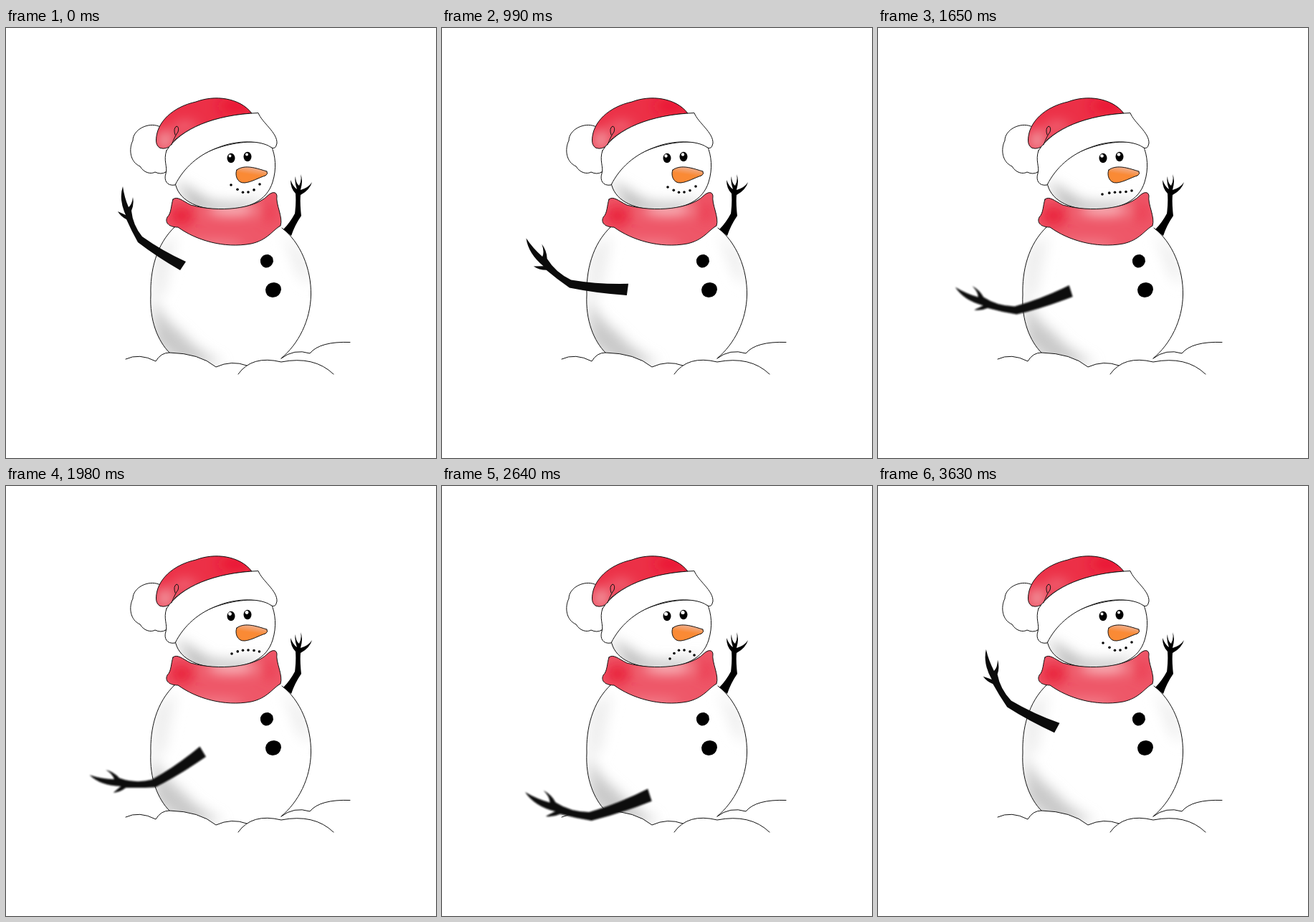
An HTML page that plays this animation: 600 by 600 pixels, repeating every 3960 ms.

```html
<!DOCTYPE html>
<html lang="en">
<head>
<meta charset="utf-8">
<title>Snowman</title>
<style>
  html, body { margin: 0; width: 100%; height: 100%; overflow: hidden; background: #fff; }
  svg { display: block; width: 100vw; height: 100vh; }
  .line { fill: none; stroke: #111; stroke-width: 1; stroke-linecap: round; stroke-linejoin: round; }
  .white { fill: #fff; }
</style>
</head>
<body>
<svg viewBox="0 0 600 600">
  <defs>
    <path id="bodyShape" d="M236,277 C209,302 201,340 202,372 C200,408 212,437 228,453 Q270,454 293,473 Q315,463 336,471 Q355,460 384,461 C408,441 425,408 425.500,372 C426,336 411,299 385,279 Z"/>
    <path id="headShape" d="M236,216 C240,239 264,253 301,253.500 C339,253 364,241 372,215 C378,196 376,178 370,164 C345,150 255,165 236,216 Z"/>
    <path id="hatShape" d="M209.500,156 C210,131 233,110 265,103 C291,93 326,97 343,119 C303,122 262,133 236,156 Q232,162 231,163 Q224,170 215,167.500 Q209,164 209.500,156 Z"/>
    <path id="scarfShape" d="M233,239 C239,234 246,241 258,247 C298,258 346,252 364,235 C371,228 377,228 378,234 C376,246 387,264 383,276 C372,282 365,296 342,301 C304,308 265,296 240,278 C228,278 221,272 225,264 C231,258 230,248 233,239 Z"/>
    <path id="noseShape" d="M322,198 C334,189 353,197 364,200 Q366,204 362,206 C352,209 343,215 333,216 C322,217 319,204 322,198 Z"/>
    <clipPath id="bodyClip"><use href="#bodyShape"/></clipPath>
    <clipPath id="headClip"><use href="#headShape"/></clipPath>
    <clipPath id="hatClip"><use href="#hatShape"/></clipPath>
    <clipPath id="scarfClip"><use href="#scarfShape"/></clipPath>
    <linearGradient id="orange" x1=".4" y1="1" x2=".7" y2="0">
      <stop offset=".5" stop-color="#fa8a35"/><stop offset="1" stop-color="#eeb6a0"/>
    </linearGradient>
    <filter id="soft" x="-60%" y="-60%" width="220%" height="220%"><feGaussianBlur stdDeviation="9"/></filter>
    <filter id="armBlur" x="-10%" y="-10%" width="120%" height="120%"><feGaussianBlur id="armBlurSize" stdDeviation="0"/></filter>
  </defs>

  <rect width="600" height="600" fill="#fff"/>

  <use href="#bodyShape" class="white"/>
  <g clip-path="url(#bodyClip)" filter="none">
    <g filter="url(#soft)">
      <path d="M203,370 Q216,405 245,425 Q265,450 303,468 L245,470 L208,440 Z" fill="#c9c9c9"/>
      <path d="M206,310 L238,288 L222,370 L202,380 Z" fill="#eee"/>
      <path d="M385,284 L414,315 L426,360 L408,345 Z" fill="#ececec"/>
    </g>
  </g>
  <path class="line" d="M236,277 C209,302 201,340 202,372 C200,408 212,437 228,453 M384,461 C408,441 425,408 425.500,372 C426,336 411,299 385,279"/>
  <path class="line" d="M167,462 Q186,453 209,465 Q216,453 228,453 Q270,454 293,473 Q315,463 336,471 M324,483 Q343,456 384,466 Q430,457 457,483 M384,461 Q402,447 424,454 Q438,437 480,438.500"/>

  <use href="#headShape" class="white"/>
  <g clip-path="url(#headClip)">
    <path filter="url(#soft)" d="M236,212 Q262,226 282,240 Q320,250 365,236 L330,258 L260,256 Z" fill="#bdbdbd"/>
  </g>
  <use href="#headShape" class="line"/>

  <use href="#scarfShape" fill="#ee5768"/>
  <g clip-path="url(#scarfClip)"><g filter="url(#soft)">
    <ellipse cx="245" cy="262" rx="17" ry="14" fill="#e9203a"/>
    <ellipse cx="315" cy="253" rx="34" ry="7" fill="#fbd5d6"/>
    <ellipse cx="368" cy="257" rx="10" ry="16" fill="#ec4055"/>
    <ellipse cx="290" cy="304" rx="42" ry="5" fill="#f49aa2"/>
  </g></g>
  <use href="#scarfShape" class="line"/>

  <path class="line white" d="M213,137 C198,131 177,142 177,157 C171,169 173,187 187,193 C193,203 203,204 208,201 Q216,205 223,201 L240,160 Z"/>
  <use href="#hatShape" fill="#ec3047"/>
  <g clip-path="url(#hatClip)"><g filter="url(#soft)">
    <ellipse cx="222" cy="157" rx="13" ry="15" fill="#f29aa2"/>
    <ellipse cx="320" cy="109" rx="24" ry="10" fill="#ea1433"/>
    <ellipse cx="250" cy="138" rx="17" ry="7" fill="#f17582"/>
  </g></g>
  <use href="#hatShape" class="line"/>
  <path class="line white" d="M224,171 C244,140 291,121 352,118.500 C357,132 379,146 378,161 Q376,171 369,166 C356,157 324,156 298,166 C269,176 248,195 236,219 C224,221 220,212 223,203 C226,194 219,185 224,171 Z"/>
  <path class="line" d="M231,163 Q236,150 240,145 Q242,138 238,137 Q233,140 236,149"/>

  <g>
    <ellipse cx="314" cy="181.500" rx="5.500" ry="6.700"/>
    <ellipse cx="337" cy="179.500" rx="5.500" ry="6.700"/>
    <circle class="glint white" cx="312.500" cy="178.500"/>
    <circle class="glint white" cx="336" cy="176.500"/>
  </g>
  <use href="#noseShape" fill="url(#orange)"/>
  <use href="#noseShape" class="line"/>
  <g id="mouth"></g>

  <path d="M355,323 Q358,315 366,316 Q373,318 373,326 Q370,335 362,334.500 Q354,332 355,323 Z"/>
  <path d="M362,365 Q364,355 374,355 Q384,356 384,365 Q382,376 372,376 Q362,375 362,365 Z"/>

  <path d="M387,281 Q396,272 403,259 Q405,245 404,231 Q397,224 397,212 Q401,222 406,225 Q402,214 404,207 Q404,216 409,220 Q413,213 411,204 Q415,212 411,226 Q422,223 427,215 Q424,226 411,233 Q410,245 412,262 Q403,275 398,290 Z"/>
  <g filter="url(#armBlur)">
    <path id="arm" fill="#0b0b0b" d="M251,326 L243,338 Q210,319 184,299 Q175,283 168,267 Q160,263 156,256 Q163,259 167,261 Q162,250 161,240 Q160,230 163,221 Q165,236 171,250 Q176,246 177,236 Q179,246 175,255 Q177,275 190,291 Q218,311 251,326 Z"/>
  </g>
</svg>
<script>
  const STEP = 330;
  // Each pose: elbow x, elbow y, arm turn, arm scale, left mouth corner x, y, right corner y, arm blur
  const poses = [
    [187, 295, 0, 1, 314, 219, 218, 0],
    [183, 304, -5, 1.06, 314, 219, 218, .5],
    [180, 331, -15.5, 1.1, 314, 220, 219, .6],
    [179, 357, -26, 1.14, 315, 222, 221, .7],
    [184, 376, -38.5, 1.16, 314, 227, 224, .8],
    [192, 394, -51, 1.16, 313, 232, 227, .8],
    [206, 415, -64.5, 1.16, 315, 234, 231, .8],
    [207, 438, -58, 1.2, 317, 238, 234, .9],
    [207, 461, -51.5, 1.25, 318, 241, 236, .9],
    [216, 476, -61.5, 1.23, 321, 241, 236, 1.1]
  ];
  const order = [0, 1, 2, 3, 4, 5, 6, 7, 8, 9, 0, 1];
  const byId = id => document.getElementById(id);
  const arm = byId('arm');
  const blur = byId('armBlurSize');
  const glints = document.querySelectorAll('.glint');
  const dots = Array.from({ length: 6 }, () => {
    const dot = document.createElementNS('http://www.w3.org/2000/svg', 'circle');
    dot.setAttribute('r', 1.8);
    return byId('mouth').appendChild(dot);
  });

  function drawMouth(left, leftY, rightY) {
    const bend = (y, amount) => 229 + (y - 229) * amount;
    const points = [
      [left, leftY], [323 + (left - 314) * .25, bend(leftY, .38)],
      [330.5, 229.3], [338, 229], [346, bend(rightY, .28)], [354 - Math.max(0, rightY - 229) * .28, rightY]
    ];
    points.forEach(([x, y], i) => {
      dots[i].setAttribute('cx', x);
      dots[i].setAttribute('cy', y);
    });
  }

  function draw(now) {
    const index = order[Math.floor(now / STEP) % order.length];
    const [x, y, turn, scale, left, leftY, rightY, softness] = poses[index];
    arm.setAttribute('transform', `translate(${x} ${y}) rotate(${turn}) scale(${scale}) translate(-187 -295)`);
    blur.setAttribute('stdDeviation', softness);
    drawMouth(left, leftY, rightY);
    glints.forEach(glint => glint.setAttribute('r', 1.9 + index * .09));
  }

  const start = performance.now();
  function tick() {
    draw(performance.now() - start);
    requestAnimationFrame(tick);
  }
  tick();
</script>
</body>
</html>
```
